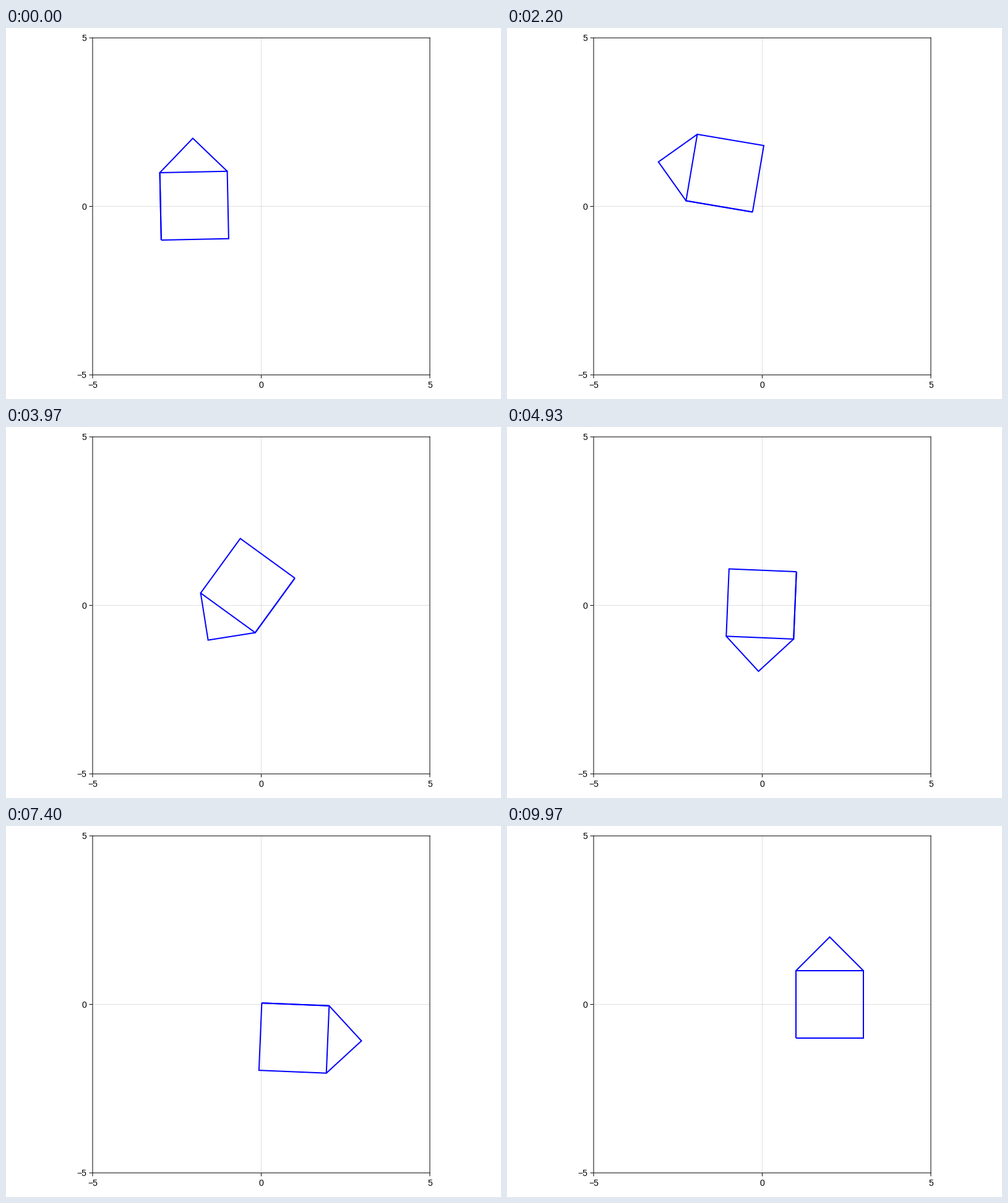
Recreate the animation shown at these times as a matplotlib script. Size 800 by 600 pixels, loop 10 s.

```python
import numpy as np
import matplotlib.pyplot as plt
from matplotlib.animation import FuncAnimation

WIDTH, HEIGHT, DPI = 800, 600, 100
FRAMES, LOOP_MS = 300, 10000
LEFT, RIGHT, TOP, BOTTOM = 140, 685, 16, 561
CENTER = np.array([(LEFT + RIGHT) / 2, (TOP + BOTTOM) / 2])
UNIT = (RIGHT - LEFT) / 10

# The left wall belongs to both strokes, so it looks a little heavier.
WALLS = np.array([(-1, -1), (1, -1), (1, 1), (-1, 1), (-1, -1)])
ROOF = np.array([(-1, -1), (-1, 1), (0, 2), (1, 1)])

fig = plt.figure(figsize=(WIDTH / DPI, HEIGHT / DPI), dpi=DPI, facecolor="white")
ax = fig.add_axes([0, 0, 1, 1])
ax.set_xlim(0, WIDTH)
ax.set_ylim(HEIGHT, 0)
ax.axis("off")


def stroke(xs, ys, color="black", width=1, **style):
    """Draw a polyline in stage pixels."""
    line, = ax.plot(xs, ys, color=color, lw=width * 72 / DPI, snap=False,
                    solid_capstyle="butt", solid_joinstyle="miter", **style)
    return line


def label(x, y, value, align):
    ax.text(x, y, str(value).replace("-", "\u2212"), ha=align, va="baseline",
            family="Liberation Sans", size=14 * 72 / DPI, color="black")


def draw_axes():
    cx, cy = CENTER
    stroke([cx, cx], [TOP, BOTTOM], alpha=0.12)
    stroke([LEFT, RIGHT], [cy, cy], alpha=0.12)
    for y in (TOP, BOTTOM):
        stroke([LEFT - 0.5, RIGHT + 0.5], [y, y])
    for x in (LEFT, RIGHT):
        stroke([x, x], [TOP - 0.5, BOTTOM + 0.5])
    for value in (-5, 0, 5):
        x, y = cx + value * UNIT, cy - value * UNIT
        stroke([x, x], [BOTTOM + 0.5, BOTTOM + 5.5])
        stroke([LEFT - 5.5, LEFT - 0.5], [y, y])
        label(x, 582.5, value, "center")
        label(130.5, y + 5, value, "right")


def place(points, t):
    """Turn the points once per loop while their center rides a sine wave."""
    angle = 2 * np.pi * t
    c, s = np.cos(angle), np.sin(angle)
    moved = points @ np.array([[c, s], [-s, c]]) + (4 * t - 2, s)
    return (CENTER + moved * (UNIT, -UNIT)).T


def update(frame):
    t = (frame + 1) / FRAMES
    for line, points in house:
        line.set_data(*place(points, t))
    return [line for line, _ in house]


draw_axes()
house = [(stroke([], [], "blue", 2), points) for points in (WALLS, ROOF)]
anim = FuncAnimation(fig, update, frames=FRAMES, interval=LOOP_MS / FRAMES,
                     repeat=True, repeat_delay=0)
plt.show()
```
